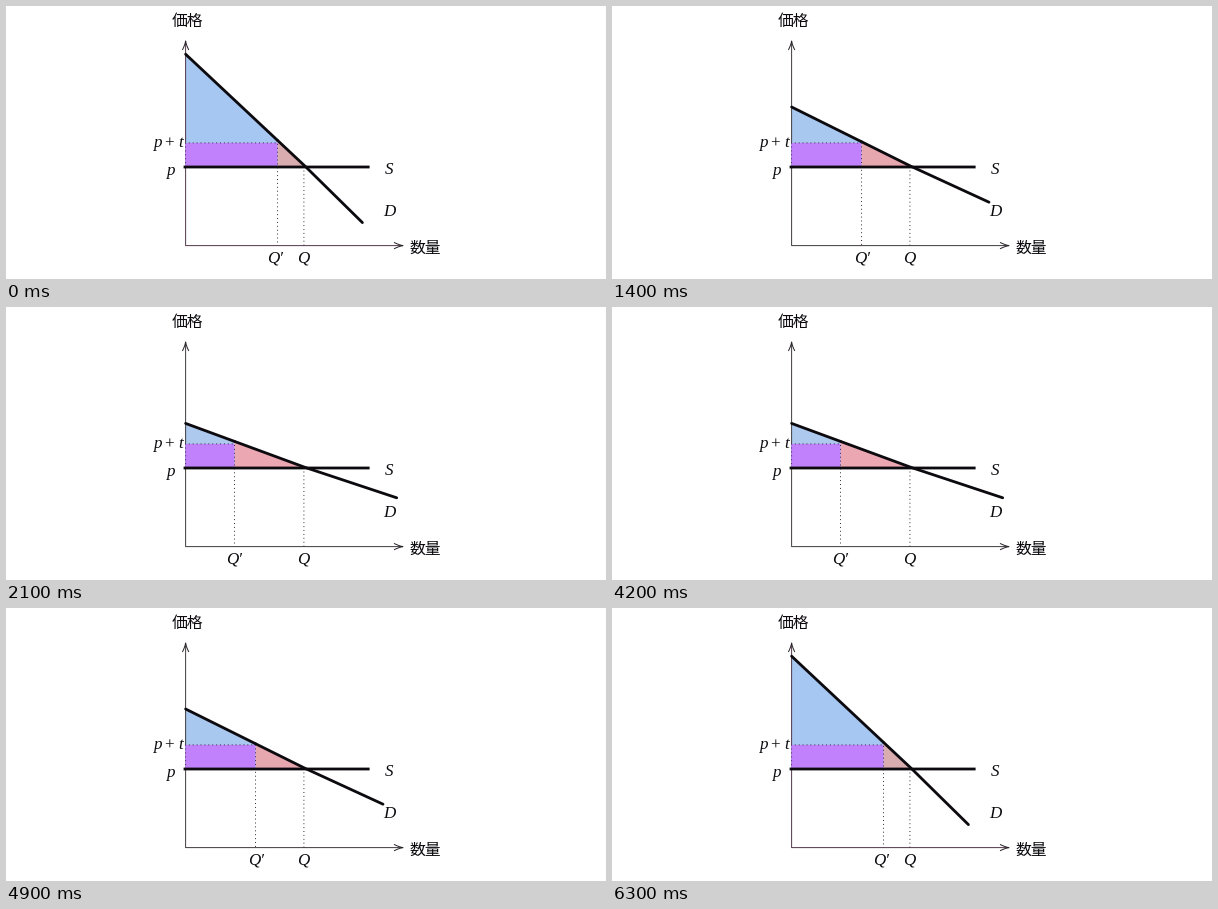
A matplotlib script for the animation above (7 s loop, 600 by 273 pixels).

```python
import matplotlib.pyplot as plt
from matplotlib.animation import FuncAnimation

W, H, DPI = 600, 273, 100
PX = 72 / DPI
INK = "#0c0a0e"
X0, BASE = 179.6, 239.6        # origin of the axes
P, PT = 161, 136.9             # price without and with the tax
PIVOT = (299.4, 160.5)
Q = 297.9

# intercept, line end, taxed quantity, its label, blue, pink, axis, upper line
STATES = [
    (48.2, (356.4, 216.6), 271.5, 269.5, "#a6c7f1", "#d9adb0", "#54384c", INK),
    (84.2, (364.4, 201.8), 264.5, 269.5, "#a6c7f1", "#dfa9ae", "#443c46", "#3a353f"),
    (101, (377, 196.2), 249.5, 250.5, "#a9c8ef", "#e6a8ae", "#403c40", INK),
    (116.4, (390.7, 190.8), 228.5, 228.5, "#adcaee", "#eca8b2", "#403c40", INK),
    (131, (400, 186), 203.5, 203.5, "#adcaee", "#eca8b2", "#403c40", INK),
]
ORDER = list(range(5)) + list(range(4, -1, -1))

fig = plt.figure(figsize=(W / DPI, H / DPI), dpi=DPI, facecolor="white")
ax = fig.add_axes([0, 0, 1, 1])
ax.set_xlim(0, W)
ax.set_ylim(H, 0)
ax.axis("off")


def line(points, width=1.0, color=INK, **kw):
    xs, ys = zip(*points)
    kw.setdefault("solid_capstyle", "butt")
    return ax.plot(xs, ys, color=color, lw=width * PX, snap=False, **kw)[0]


def dotted(points=((0, 0), (0, 0))):
    return line(points, 1.0, "#38323e", ls=(0, (1, 2.9)),
                dash_capstyle="butt", zorder=4)


def label(x, y, s, size=17, italic=True, font="Liberation Serif"):
    return ax.text(x, y, s, fontsize=size * PX, family=font, color=INK,
                   style="italic" if italic else "normal",
                   ha="center", va="baseline", zorder=6)


def area(color, z=1):
    return ax.fill([0, 0, 0], [0, 0, 0], color=color, lw=0, zorder=z, snap=False)[0]


def arrow(x, y, dx, dy):
    pts = []
    for side in (-1, 1):
        arm = [(x - dx * 9 * k - dy * side * 3.2 * k ** 1.4,
                y - dy * 9 * k + dx * side * 3.2 * k ** 1.4)
               for k in (0, 0.25, 0.5, 0.75, 1)]
        pts += arm[::-1] if side < 0 else arm[1:]
    line(pts, 1.0, "#2a262c", zorder=3)


blue, pink, purple = area("#a6c7f1"), area("#d9adb0"), area("#c181fd", 2.5)
axes = line([(X0, 35), (X0, BASE), (397, BASE)], 1.0, zorder=2)
arrow(X0, 35, 0, -1)
arrow(397, BASE, 1, 0)

tax_dots = dotted()
dotted([(Q, BASE), (Q, P)])
line([(177.6, P), (363.6, P)], 2.8, zorder=5)
upper = line([(0, 0), (0, 0)], 2.8, zorder=5, solid_capstyle="round")
lower = line([(0, 0), (0, 0)], 2.8, zorder=5, solid_capstyle="round")

label(181.5, 19.8, "価格", 15.8, False, "Noto Sans CJK JP")
label(418.8, 247, "数量", 15.8, False, "Noto Sans CJK JP")
label(152, 141.3, "p")
label(163.4, 141.3, "+", 17, False)
label(174.6, 141.3, "t")
label(164.8, 168.6, "p")
label(382.7, 167.7, "S")
label(383.2, 210.3, "D")
label(296.7, 256.6, "Q")
taxed = label(0, 256.6, "Q′")


def draw(i):
    top, end, q, tag, sky, rose, axis, edge = STATES[ORDER[i % len(ORDER)]]
    slope = (PIVOT[1] - top) / (PIVOT[0] - X0)
    at_q = top + slope * (q - X0)
    blue.set_xy([(X0, top), (q, at_q), (q, P), (X0, P)])
    pink.set_xy([(q, at_q), PIVOT, (q, P)])
    purple.set_xy([(X0 - 0.5, PT), (q, PT), (q, P), (X0 - 0.5, P)])
    blue.set_color(sky)
    pink.set_color(rose)
    axes.set_color(axis)
    tax_dots.set_data([X0, X0, q, q], [P, PT, PT, BASE])
    upper.set_data([X0, q], [top, at_q])
    upper.set_color(edge)
    lower.set_data([q, PIVOT[0], end[0]], [at_q, PIVOT[1], end[1]])
    taxed.set_x(tag)
    return blue, pink, purple, axes, tax_dots, upper, lower, taxed


anim = FuncAnimation(fig, draw, frames=len(ORDER), interval=700,
                     repeat=True, repeat_delay=0, blit=False)
plt.show()
```
